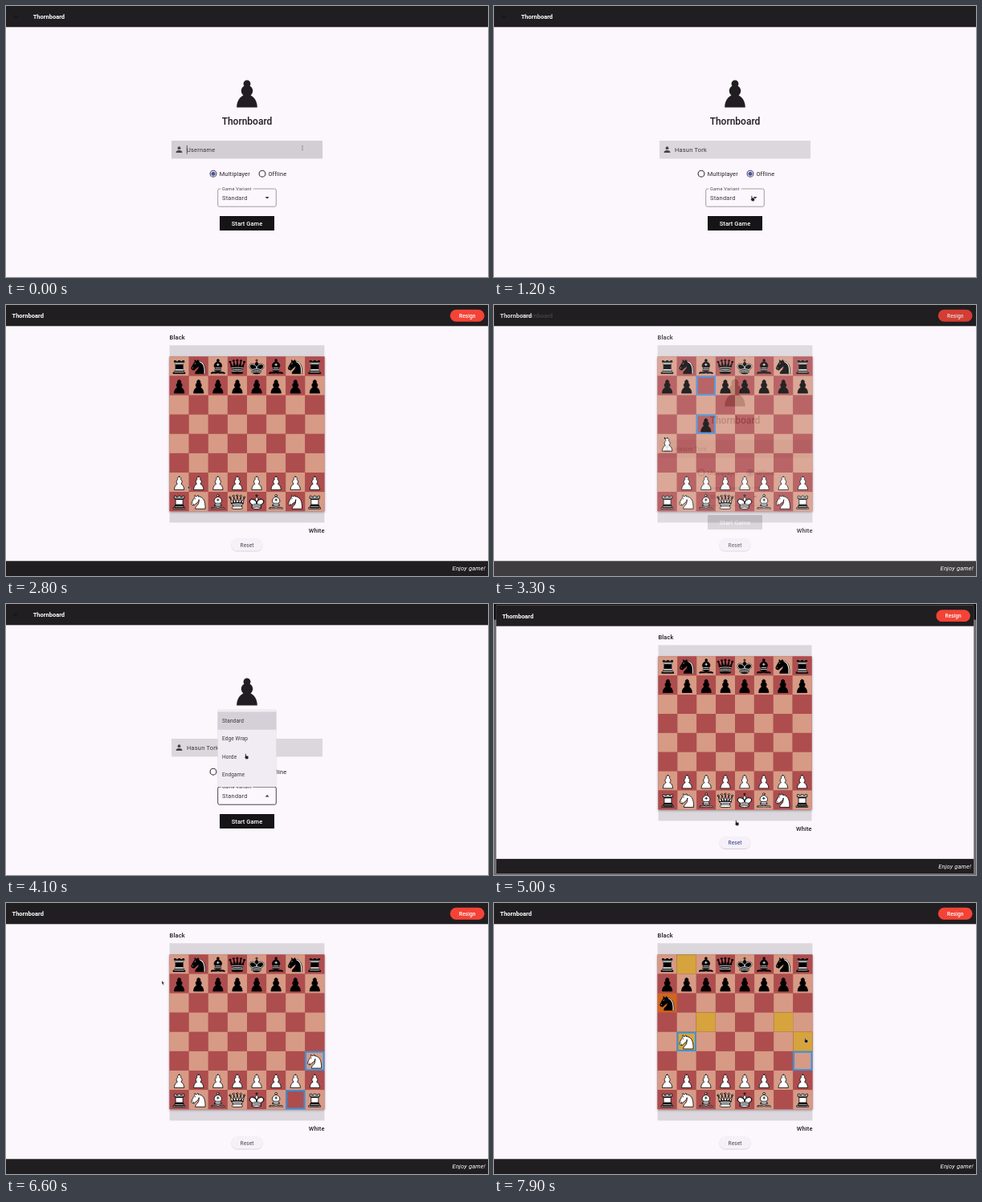
Animation of 600x338 px, one loop 8 s. Source, as an HTML page:

```html
<!DOCTYPE html>
<html lang="en">
<head>
<meta charset="utf-8">
<title>Chess lobby</title>
<style>
html, body { margin: 0; width: 100%; height: 100%; overflow: hidden; background: #fcf6fd; }
svg { display: block; width: 100%; height: 100%; font-family: Roboto, "Open Sans", sans-serif; }
text { fill: #1d1b20; white-space: pre; }
.bar { fill: #201e21; }
.brand { font-size: 7.5px; font-weight: 700; fill: #fff; }
.big { font-size: 12px; font-weight: 500; text-anchor: middle; }
.body { font-size: 7.43px; letter-spacing: .23px; fill: #3a363e; }
.radio { font-size: 7.3px; letter-spacing: .2px; }
.label { font-size: 5.6px; letter-spacing: .23px; fill: #49454f; }
.item { font-size: 6.56px; letter-spacing: .1px; fill: #3c383f; }
.btn { font-size: 7.5px; font-weight: 500; letter-spacing: .05px; text-anchor: middle; fill: #fff; }
.pill { font-size: 6.56px; font-weight: 500; letter-spacing: .05px; text-anchor: middle; }
.side { font-size: 7.5px; font-weight: 500; letter-spacing: .15px; }
.end { text-anchor: end; }
.note { font-size: 7.5px; letter-spacing: .17px; font-style: italic; fill: #fff; }
.light { fill: #fff; }
.ring { fill: none; stroke-width: 1.1; }
.pc { stroke: #000; stroke-width: 1.5; stroke-linecap: round; stroke-linejoin: round; }
.pc.w { fill: #fff; }
.pc.b { fill: #000; }
.pc .ln { fill: none; }
.pc.b .ln { stroke: #fff; }
.pc .hi { fill: #fff; stroke: none; }
#cursor path { fill: #1c1c1e; stroke: #fff; stroke-width: .4; }
#cursor .beam { fill: none; stroke: #777; stroke-width: .6; }
</style>
</head>
<body>
<svg viewBox="0 0 600 338">
  <defs>
    <filter id="shadow" x="-10%" y="-10%" width="120%" height="125%">
      <feDropShadow dx="0" dy="1" stdDeviation="1.6" flood-opacity=".4"/>
    </filter>
    <filter id="soft" x="-10%" y="-20%" width="120%" height="150%">
      <feDropShadow dx="0" dy=".5" stdDeviation=".6" flood-opacity=".3"/>
    </filter>
  </defs>

  <g id="home">
    <rect width="600" height="338" fill="#fcf6fd"/>
    <rect class="bar" width="600" height="26.3"/>
    <path d="M15 13.3H10m2.3-2.3L10 13.3l2.3 2.3" fill="none" stroke="#151316" stroke-width=".9"/>
    <text class="brand" x="33.7" y="16.2">Thornboard</text>
    <g id="emblem" transform="translate(274.96 82.5) scale(1.113)" fill="#201e21"></g>
    <text class="big" x="300" y="148.3">Thornboard</text>

    <rect id="field" x="206" y="168" width="188" height="22.4"/>
    <g fill="#49454f">
      <circle cx="215.5" cy="177.2" r="1.9"/>
      <path d="M211.7 182.9v-1c0-1.3 2.5-1.9 3.8-1.9s3.8.6 3.8 1.9v1z"/>
    </g>
    <text id="hint" class="body" x="225" y="181.7">Username</text>
    <text id="name" class="body" x="225" y="181.7"></text>
    <rect id="caret" y="173.8" width=".9" height="10.8" fill="#5a3d63"/>

    <circle id="halo" cx="319" cy="209" r="9.5" fill="#4b4f88" opacity=".1"/>
    <g id="multi"><circle class="ring" cx="258" cy="209.2" r="3.9"/><circle cx="258" cy="209.2" r="2.5"/></g>
    <g id="off"><circle class="ring" cx="319" cy="209.2" r="3.9"/><circle cx="319" cy="209.2" r="2.5"/></g>
    <text class="radio" x="265.8" y="211.8">Multiplayer</text>
    <text class="radio" x="326.4" y="211.8">Offline</text>

    <rect id="box" x="263.7" y="228" width="72.6" height="22.2" rx="2" fill="none"/>
    <rect x="267.3" y="226.5" width="40.4" height="3" fill="#fcf6fd"/>
    <text class="label" x="269" y="230">Game Variant</text>
    <text id="variant" class="body" x="269" y="241.7"></text>
    <path id="arrow" d="M-2.4-1.2h4.8L0 1.2z" fill="#333"/>

    <rect id="start" x="266" y="262" width="68" height="18"/>
    <text class="btn" x="300" y="273.7">Start Game</text>

    <g id="menu">
      <rect x="263.5" y="131" width="73" height="97" rx="1.5" fill="#f1ebf3" filter="url(#soft)"/>
      <rect x="263.5" y="134.5" width="73" height="22.3" fill="#d5d0d7"/>
    </g>
  </g>

  <rect id="scrim" width="600" height="338"/>

  <g id="game">
    <rect width="600" height="338" fill="#fcf6fd"/>
    <rect class="bar" width="600" height="26.3"/>
    <rect class="bar" y="319.3" width="600" height="18.7"/>
    <text class="brand" x="7.5" y="16.2">Thornboard</text>
    <rect x="552.8" y="5.7" width="42.8" height="15" rx="7.5" fill="#f44336"/>
    <text class="pill light" x="574.2" y="15.7">Resign</text>
    <text class="side" x="203.6" y="42.8">Black</text>
    <text class="side end" x="396.6" y="284.4">White</text>
    <rect x="203.6" y="50.2" width="192.8" height="221.2" fill="#dcd7dd"/>
    <rect x="203.6" y="64.4" width="192.8" height="192.8" fill="#ae4d4e" filter="url(#shadow)"/>
    <g id="board" transform="translate(203.6 64.4)"></g>
    <rect x="280.3" y="291.5" width="39.4" height="14.9" rx="7.45" fill="#f6f0f8" filter="url(#soft)"/>
    <text id="reset" class="pill" x="300" y="301.7">Reset</text>
    <text class="note end" x="596.9" y="331.3">Enjoy game!</text>
  </g>

  <g id="cursor">
    <path data-kind="hand" d="M-1.8-3.2h1.3v2.3l2.8.7v2.4l-.8 1.2h-2.4l-1.8-2.3.9-.4z"/>
    <path data-kind="arrow" d="M-1.3-2.8l3.2 3.2-1.4.1.8 1.8-.9.4-.8-1.8-.9.9z"/>
    <path data-kind="beam" class="beam" d="M-.8-2.6h1.6M0-2.6v5.2M-.8 2.6h1.6"/>
  </g>
</svg>

<script>
const LOOP = 8000, SQ = 24.1;
const $ = id => document.getElementById(id);
const set = (id, attrs) => { for (const k in attrs) $(id).setAttribute(k, attrs[k]); };
const show = (id, on) => set(id, { display: on ? 'inline' : 'none' });
const clamp = v => Math.min(1, Math.max(0, v));
const within = (t, a, b) => t >= a && t < b;

// Piece outlines on a 45 by 45 grid: body, inner lines, light accents on black.
const SHAPES = {
  p: ['M22.5 9c-2.2 0-4 1.8-4 4 0 .9.3 1.7.8 2.4C17.3 16.5 16 18.6 16 21c0 2 .9 3.8 2.4 5C15.4 27.1 11 31.6 11 39.5H34c0-7.9-4.4-12.4-7.4-13.5C28.1 24.8 29 23 29 21c0-2.4-1.3-4.5-3.3-5.6.5-.7.8-1.5.8-2.4 0-2.2-1.8-4-4-4z'],
  r: ['M9 39h27v-3H9zM12 36v-4h21v4zM12.5 32l1.5-2.5h17l1.5 2.5zM14 29.5v-13h17v13zM14 16.5L11 14V9h4v2h5V9h5v2h5V9h4v5l-3 2.5z',
    'M12 35.5h21M13 31.5h19M14 29.5h17M14 16.5h17M11 14h23'],
  n: ['M22 10c10.5 1 16.5 8 16 29H15c0-9 10-6.5 8-21M24 18c.4 2.9-5.5 7.4-8 9-3 2-2.8 4.3-5 4-1-.9 1.4-3 0-3-1 0 .2 1.2-1 2-1 0-4 1-4-4 0-2 6-12 6-12s1.9-1.9 2-3.5c-.7-1-.5-2-.5-3 1-1 3 2.5 3 2.5h2s.8-2 2.5-3c1 0 1 3 1 3',
    'M9 25.5v.1M14.8 15l-.6 1',
    'M24.5 10.4l-.4 1.4.5.2c3.1 1 5.6 2.5 7.9 6.8S35.7 29 35.2 39.5h2.3c.5-10.5-.9-17.3-3.3-21.8-2.4-4.5-5.8-6.6-9.2-7.2z'],
  b: ['M9 36c3.4-1 10.1.4 13.5-2 3.4 2.4 10.1 1 13.5 2 0 0 1.6.5 3 2-.7 1-1.6 1-3 .5-3.4-1-10.1.5-13.5-1-3.4 1.5-10.1 0-13.5 1-1.4.5-2.3.5-3-.5 1.4-1.9 3-2 3-2zM15 32c2.5 2.5 12.5 2.5 15 0 .5-1.5 0-2 0-2 0-2.5-2.5-4-2.5-4 5.5-1.5 6-11.5-5-15.5-11 4-10.5 14-5 15.5 0 0-2.5 1.5-2.5 4 0 0-.5.5 0 2zM25 8a2.5 2.5 0 1 1-5 0 2.5 2.5 0 1 1 5 0z',
    'M17.5 26h10M15 30h15m-7.5-14.5v5M20 18h5'],
  q: ['M9 26c8.5-1.5 21-1.5 27 0l2.5-12.5L31 25l-.3-14.1-5.2 13.6-3-14.5-3 14.5-5.2-13.6L14 25 6.5 13.5zM9 26c0 2 1.5 2 2.5 4 1 1.5 1 1 .5 3.5-1.5 1-1.5 2.5-1.5 2.5-1.5 1.5.5 2.5.5 2.5 6.5 1 16.5 1 23 0 0 0 1.5-1 0-2.5 0 0 .5-1.5-1-2.5-.5-2.5-.5-2 .5-3.5 1-2 2.5-2 2.5-4-8.5-1.5-18.5-1.5-27 0z'
    + [[6, 12], [14, 9], [22.5, 8], [31, 9], [39, 12]].map(([x, y]) => `M${x - 2} ${y}a2 2 0 1 1 4 0 2 2 0 1 1-4 0z`).join(''),
    'M9 26c8.5-1.5 18.5-1.5 27 0M11.5 30c3.5-1 18.5-1 22 0M12 33.5c6-1 15-1 21 0'],
  k: ['M22.5 11.6V6M20 8h5M22.5 25s4.5-7.5 3-10.5c0 0-1-2.5-3-2.5s-3 2.5-3 2.5c-1.5 3 3 10.5 3 10.5M11.5 37c5.5 3.5 15.5 3.5 21 0v-7s9-4 6-10.5c-4-6.5-13.5-3.5-16 4V27v-3.5c-3.5-7.5-13-10.5-16-4-3 6.5 5 10 5 10z',
    'M11.5 30c5.5-3 15.5-3 21 0M11.5 33.5c5.5-3 15.5-3 21 0M11.5 37c5.5-3 15.5-3 21 0M32 29.5s8.5-4 6-9.7C34 14 25 18 22.5 24.6v2.1-2.1C20 18 10 14 7 19.8c-2.5 5.6 4.8 9 4.8 9']
};

// Squares are numbered 0 to 63 from the top left.
const at = s => (8 - s[1]) * 8 + s.charCodeAt(0) - 97;
const isWhite = p => p < 'a';
const START = 'rnbqkbnr' + 'p'.repeat(8) + ' '.repeat(32) + 'P'.repeat(8) + 'RNBQKBNR';

// Clicks: one square selects, two squares move.
const GAMES = [
  [[2890, 'a2'], [2980, 'a2a4'], [3080, 'c7'], [3180, 'c7c5']],
  [[5650, 'g1'], [6080, 'g1h3'], [6780, 'b8'], [6980, 'b8a6'], [7230, 'h3'], [7470, 'h3b4'], [7680, 'a6']]
];

function position(clicks, t) {
  const cells = [...START];
  let picked = -1, last = [];
  for (const [when, move] of clicks) {
    if (when > t) break;
    const from = at(move);
    if (move.length === 2) { picked = from; continue; }
    const to = at(move.slice(2));
    cells[to] = cells[from];
    cells[from] = ' ';
    last = [from, to];
    picked = -1;
  }
  return { cells, picked, last };
}

// Knights may cross the left and right edges.
function targets(cells, sq) {
  const p = cells[sq], row = sq >> 3, col = sq & 7;
  if (p.toLowerCase() === 'p') {
    const step = isWhite(p) ? -8 : 8;
    return [sq + step, sq + 2 * step];
  }
  const out = [];
  for (const dr of [-2, -1, 1, 2]) for (const side of [-1, 1]) {
    const r = row + dr, to = r * 8 + (col + side * (3 - Math.abs(dr)) + 8) % 8;
    if (r < 0 || r > 7) continue;
    if (cells[to] === ' ' || isWhite(cells[to]) !== isWhite(p)) out.push(to);
  }
  return out;
}

function piece(p, x, y) {
  const [body, lines, accent] = SHAPES[p.toLowerCase()], white = isWhite(p);
  return `<g class="pc ${white ? 'w' : 'b'}" transform="translate(${x} ${y}) scale(${SQ / 45})"><path d="${body}"/>`
    + (lines ? `<path class="ln" d="${lines}"/>` : '')
    + (accent && !white ? `<path class="hi" d="${accent}"/>` : '') + '</g>';
}

let drawn = '';
function drawBoard(clicks, t) {
  const { cells, picked, last } = position(clicks, t);
  const key = cells.join('') + picked + last;
  if (key === drawn) return;
  drawn = key;
  const legal = picked < 0 ? [] : targets(cells, picked);
  let squares = '', marks = '', men = '';
  cells.forEach((p, i) => {
    const col = i & 7, row = i >> 3, x = col * SQ, y = row * SQ;
    let fill = (col + row) % 2 ? '#ae4d4e' : '#d69a85', edge = '';
    if (i === picked) fill = '#d0651f';
    if (legal.includes(i)) { fill = '#d6a33d'; edge = ' stroke="#a17b34" stroke-width=".5"'; }
    squares += `<rect x="${x}" y="${y}" width="${SQ}" height="${SQ}" fill="${fill}"${edge}/>`;
    if (last.includes(i))
      marks += `<rect x="${x + .9}" y="${y + .9}" width="${SQ - 1.8}" height="${SQ - 1.8}" fill="none" stroke="#2b95ea" stroke-width="1.8"/>`;
    if (p !== ' ') men += piece(p, x, y + .3);
  });
  $('board').innerHTML = squares + marks + men;
}

// Pointer path: time, x, y, shape.
const PATH = [
  [0, 369, 177, 'beam'], [250, 369, 177, 'beam'], [680, 352, 181, 'beam'], [860, 319, 210, 'hand'], [1050, 319, 210, 'hand'],
  [1200, 322, 240, 'hand'], [1280, 322, 240, 'hand'], [1450, 300, 185, 'hand'], [1560, 297, 151, 'hand'], [1650, 297, 151, 'hand'],
  [1800, 305, 260, 'hand'], [2000, 308, 266, 'hand'], [2640, 307.5, 266, 'arrow'], [2850, 215, 222, 'hand'], [2900, 215, 222, 'hand'],
  [2970, 215, 175, 'hand'], [3060, 263, 101, 'hand'], [3100, 263, 101, 'hand'], [3170, 263, 150, 'hand'], [3280, 213, 166.5, 'arrow'],
  [3449, 213, 166.5, 'arrow'], [3450, 322, 240, 'hand'], [3790, 322, 240, 'hand'], [4100, 299.5, 190, 'hand'], [4260, 299, 168, 'hand'],
  [4350, 299, 168, 'hand'], [4500, 302, 247, 'hand'], [4720, 302, 247, 'hand'], [4785, 302.5, 273, 'hand'], [5150, 302.5, 273, 'arrow'],
  [5580, 360, 246, 'hand'], [5720, 360, 246, 'hand'], [6020, 384, 198, 'hand'], [6130, 384, 198, 'arrow'], [6450, 191, 106, 'arrow'],
  [6600, 195.3, 99.7, 'arrow'], [6740, 239, 77, 'hand'], [6800, 239, 77, 'hand'], [6940, 215, 126, 'hand'], [7000, 215, 126, 'hand'],
  [7200, 384, 198, 'hand'], [7250, 384, 198, 'hand'], [7440, 239, 174, 'hand'], [7500, 239, 174, 'hand'], [7640, 215, 126, 'hand'],
  [7700, 215, 126, 'hand'], [7880, 388.5, 171, 'hand'], [LOOP, 388.5, 171, 'hand']
];

function drawCursor(t) {
  const i = PATH.findIndex(k => k[0] > t), a = PATH[i - 1], b = PATH[i];
  const u = (t - a[0]) / (b[0] - a[0]), e = u * u * (3 - 2 * u);
  set('cursor', { transform: `translate(${a[1] + (b[1] - a[1]) * e} ${a[2] + (b[2] - a[2]) * e})` });
  for (const el of $('cursor').children) el.setAttribute('display', el.dataset.kind === a[3] ? 'inline' : 'none');
}

const NAME = 'Hasun Tork';

function drawHome(t) {
  const typed = NAME.slice(0, clamp((t - 80) / 580) * NAME.length);
  $('name').textContent = typed;
  show('hint', !typed);
  show('caret', t < 950);
  set('caret', { x: typed ? 225.6 + $('name').getComputedTextLength() : 224.8 });
  set('field', { fill: t < 850 ? '#d3ced4' : '#dcd7dd' });

  const offline = t >= 1000;
  show('halo', within(t, 830, 1120));
  [['multi', !offline], ['off', offline]].forEach(([id, on]) => {
    const [ring, dot] = $(id).children;
    ring.setAttribute('stroke', on ? '#45457c' : '#3a363e');
    dot.setAttribute('fill', on ? '#4b5490' : 'none');
  });

  const open = within(t, 1260, 1640) || within(t, 3790, 4340);
  show('menu', open);
  set('box', { stroke: open ? '#3f3b43' : '#7b767f', 'stroke-width': open ? .95 : .7 });
  set('arrow', { transform: `translate(325.1 239.2) scale(1 ${open ? -1 : 1})` });
  $('variant').textContent = t < 4340 ? 'Standard' : 'Edge Wrap';
  set('start', { fill: within(t, 1850, 2800) ? '#211c24' : '#161417' });
}

const ENTRIES = [2420, 4790], ENTER = 350, FADE = [3250, 3600];
const zoom = s => `translate(300 169) scale(${s}) translate(-300 -169)`;

function drawGame(t) {
  const round = t < FADE[1] ? 0 : 1;
  const u = clamp((t - ENTRIES[round]) / ENTER), p = 1 - (1 - u) ** 3;
  const fade = round ? 0 : clamp((t - FADE[0]) / (FADE[1] - FADE[0]));
  show('game', u > 0);
  show('scrim', u > 0 && u < 1);
  set('scrim', { opacity: .6 * p });
  set('home', { transform: zoom(u < 1 ? 1 + .05 * p : 1) });
  set('game', { transform: zoom(.85 + .15 * p), opacity: clamp(u / .35) * (1 - fade) });
  $('reset').style.fill = u < 1 || within(t, 5000, 5400) ? '#4d5f9c' : '#6d6a70';
  if (u > 0) drawBoard(GAMES[round], t);
}

function frame(now) {
  const t = now % LOOP;
  drawHome(t);
  drawGame(t);
  drawCursor(t);
  requestAnimationFrame(frame);
}

$('emblem').innerHTML = `<path d="${SHAPES.p[0]}"/>`;
['Standard', 'Edge Wrap', 'Horde', 'Endgame'].forEach((name, i) => {
  $('menu').insertAdjacentHTML('beforeend', `<text class="item" x="269" y="${147.9 + 22.4 * i}">${name}</text>`);
});
frame(performance.now());
</script>
</body>
</html>
```
